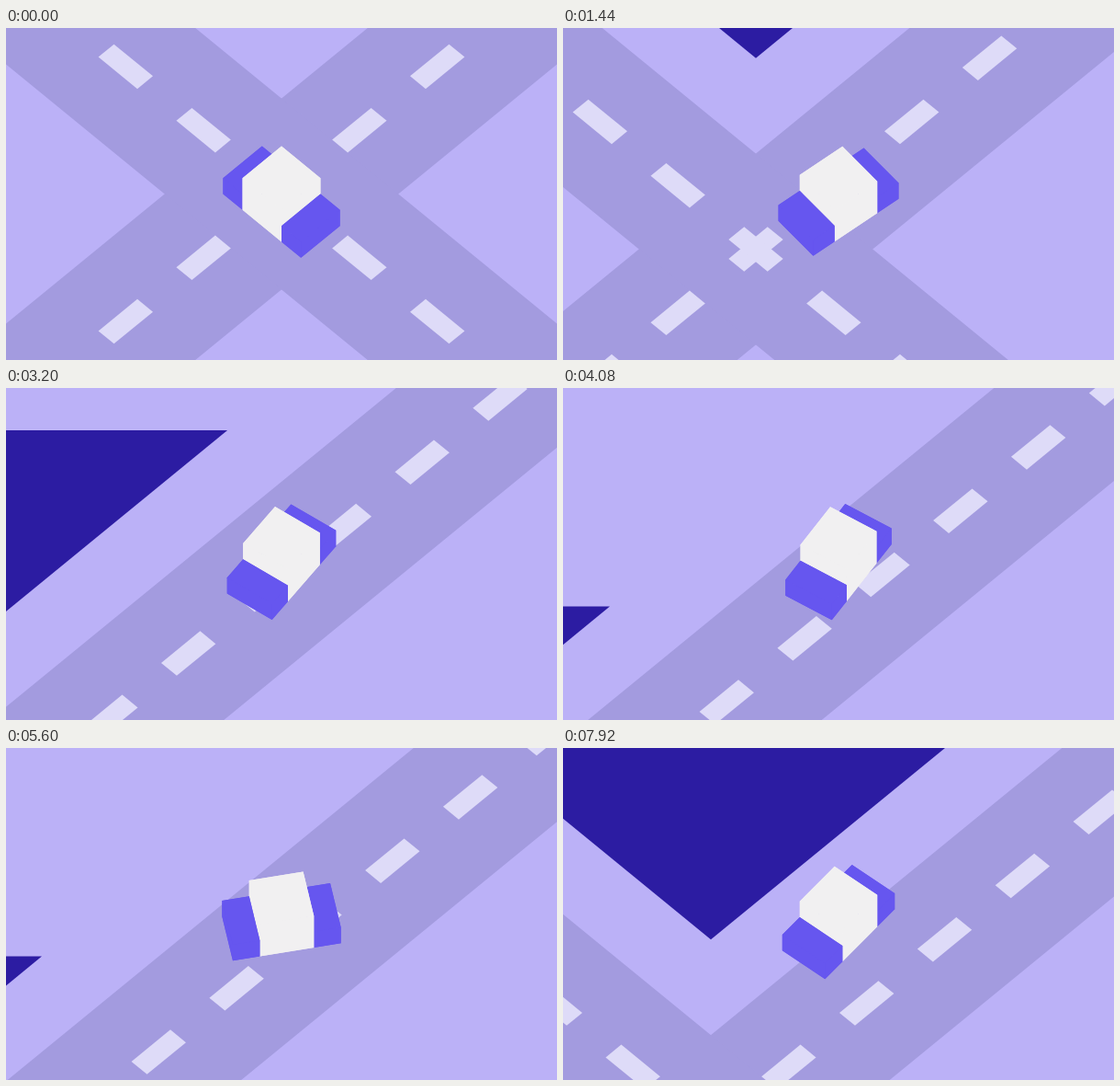
An HTML page with a canvas that plays this animation: 600 by 361 pixels, repeating every 8 s.

```html
<!DOCTYPE html>
<html>
<head>
<meta charset="utf-8">
<style>
  html, body { margin: 0; height: 100%; overflow: hidden; background: #bbb1f7; }
  canvas { display: block; }
</style>
</head>
<body>
<canvas id="stage" width="600" height="361"></canvas>
<script>
const ctx = document.getElementById('stage').getContext('2d');
const LOOP = 8000, STEP = 80;
const CX = 300, CY = 180.5;
const SQUASH = Math.sqrt(2 / 3), RISE = Math.sqrt(1 / 3); // isometric view
const COLOR = {
  ground: '#bbb1f7', road: '#a39bdf', dash: '#dedbf8',
  block: '#2c1ca2', body: '#6656ef', cabin: '#f1f0f1'
};

// time, car x, car y (up), heading in degrees
const KEYS = [
  [0, 0, 0, -45],
  [160, 0, 0, 45],
  [400, 0, 0, 45],
  [1440, 90, 73.5, 39.2],
  [2560, 195.5, 189, 50.8],
  [4080, 546, 621.5, 57.2],
  [5600, 558, 608, 11.2],
  [6800, 527.5, 584, 37.5],
  [7920, 139, 288.5, 50.8]
];

const secant = (i, c) => (KEYS[i + 1][c] - KEYS[i][c]) / (KEYS[i + 1][0] - KEYS[i][0]);

function slope(i, c) {
  if (i === 0) return 0;
  if (i === KEYS.length - 1) return secant(i - 1, c);
  const a = secant(i - 1, c), b = secant(i, c);
  return a * b > 0 ? 2 * a * b / (a + b) : 0;
}

// monotone cubic interpolation of one column
function valueAt(t, c) {
  let i = 0;
  while (i < KEYS.length - 2 && t >= KEYS[i + 1][0]) i++;
  const [k0, k1] = [KEYS[i], KEYS[i + 1]];
  const span = k1[0] - k0[0], p = (t - k0[0]) / span, q = 1 - p;
  return k0[c] * q * q * (1 + 2 * p) + k1[c] * p * p * (1 + 2 * q)
    + span * p * q * (slope(i, c) * q - slope(i + 1, c) * p);
}

function polygon(points, color) {
  ctx.fillStyle = color;
  ctx.beginPath();
  points.forEach(([x, y]) => ctx.lineTo(x, y));
  ctx.fill();
}

function drawGround(x, y) {
  ctx.setTransform(1, 0, 0, SQUASH, CX, CY);
  ctx.translate(-x, y);
  ctx.rotate(-Math.PI / 4);
  ctx.fillStyle = COLOR.road;
  ctx.fillRect(-3000, -90, 6000, 180);
  ctx.fillRect(-90, -3000, 180, 6000);
  ctx.fillStyle = COLOR.dash;
  for (let d = -2400; d <= 2400; d += 120) {
    ctx.fillRect(d - 30, -12, 60, 24);
    ctx.fillRect(-12, d - 30, 24, 60);
  }
  polygon([[180, -180], [600, -180], [180, -600]], COLOR.block);
  ctx.resetTransform();
}

function drawCar(angle) {
  const cos = Math.cos(angle), sin = Math.sin(angle);
  const project = (u, v, z) => [
    CX + u * cos + v * sin,
    CY - SQUASH * (u * sin - v * cos) - RISE * z
  ];
  const box = (from, to, top, color) => {
    const outline = [[from, -30], [to, -30], [to, 30], [from, 30]];
    const low = outline.map(([u, v]) => project(u, v, -30));
    const high = outline.map(([u, v]) => project(u, v, top));
    polygon(low, color);
    low.forEach((p, i) => {
      const j = (i + 1) % 4;
      polygon([p, low[j], high[j], high[i]], color);
    });
    polygon(high, color);
  };
  const ends = [[30, 60], [-60, -30]];
  const [far, near] = sin > 0 ? ends : ends.reverse();
  box(...far, 0, COLOR.body);
  box(-30, 30, 30, COLOR.cabin);
  box(...near, 0, COLOR.body);
}

function frame(now) {
  const t = Math.floor(now % LOOP / STEP) * STEP;
  ctx.fillStyle = COLOR.ground;
  ctx.fillRect(0, 0, 600, 361);
  drawGround(valueAt(t, 1), valueAt(t, 2));
  drawCar(valueAt(t, 3) * Math.PI / 180);
}

const start = performance.now();
(function tick() {
  frame(performance.now() - start);
  requestAnimationFrame(tick);
})();
</script>
</body>
</html>
```
